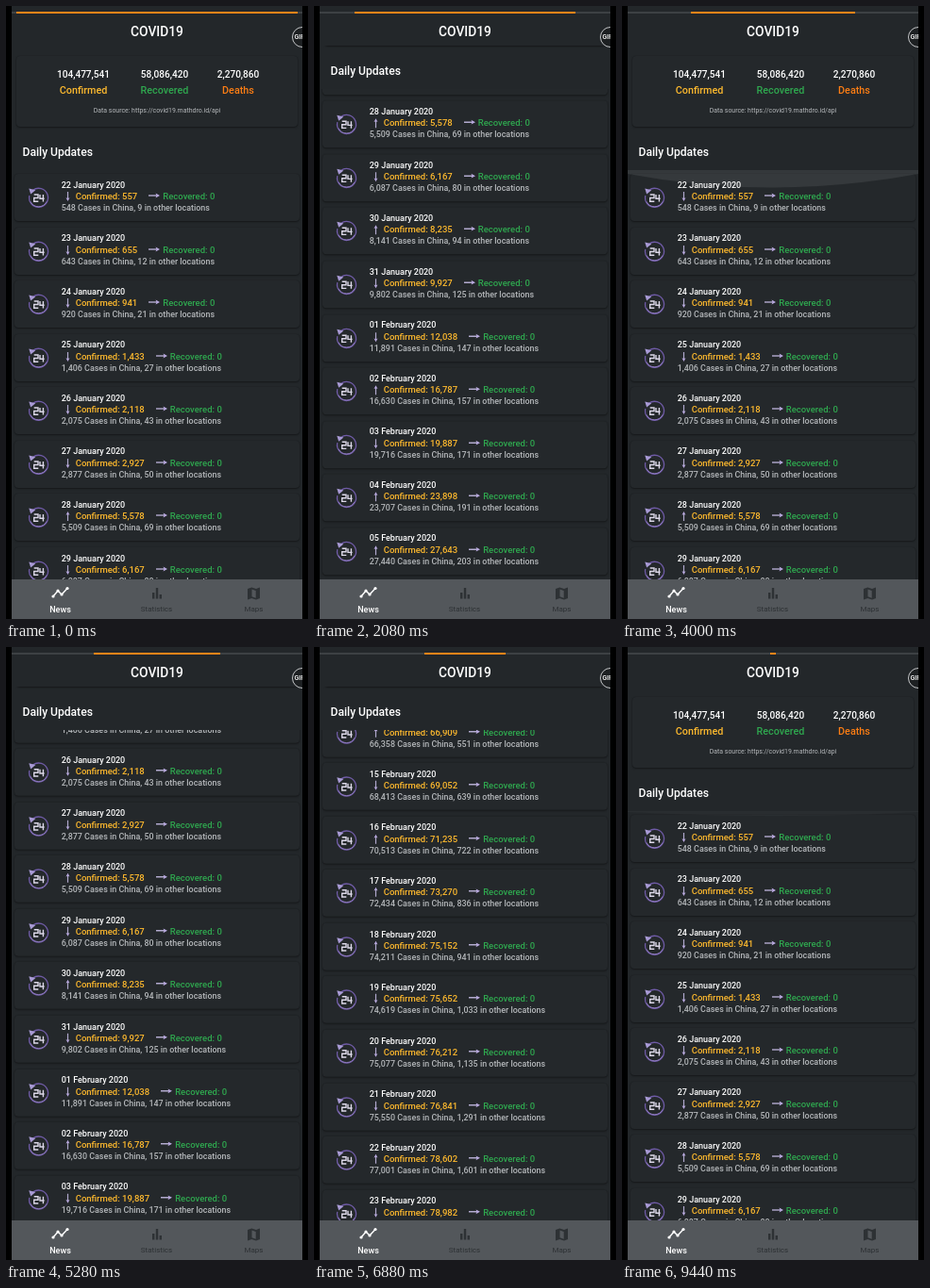
Recreate the animation shown at these times as an HTML page. Size 320x650 px, loop 9600 ms.

```html
<!DOCTYPE html>
<html lang="en">
<head>
<meta charset="utf-8">
<title>Daily updates</title>
<style>
  html, body { margin: 0; width: 100%; height: 100%; overflow: hidden; background: #000; }
  #stage { position: relative; width: 320px; height: 650px; overflow: hidden; background: #000;
    font: 500 9px Roboto, Arial, sans-serif; color: #fff; }
  #app { position: absolute; left: 6px; top: 0; width: 308px; height: 650px; overflow: hidden; background: #23272a; }
  #app div, #app svg.abs { position: absolute; }
  .t { line-height: 20px; margin-top: -10px; white-space: nowrap; }
  .mid { transform: translateX(-50%); }
  .card { border-radius: 4px; background: #24282b; box-shadow: 0 1px 2px rgba(0,0,0,.38), 0 0 1px rgba(0,0,0,.3); }
  .gold { color: #fdb92e; }
  .green { color: #2fa84f; }
  .orange { color: #fb7d14; }
  .grey { color: #b5b8bb; }
  #list { left: 0; top: 174px; width: 308px; overflow: hidden; }
  #rows { left: 0; top: 0; width: 308px; }
  .row { left: 3px; width: 302px; height: 50px; }
  .pair { font-size: 9.5px; }
  .pair svg { width: 12px; height: 6px; margin: 0 3px 0 12px; vertical-align: 1px; }
  #head { left: 0; top: 42px; width: 308px; height: 132px; background: #23272a; }
  #bar { left: 0; top: 0; width: 308px; height: 42px; background: #23272a; }
  #track { left: 0; top: 6px; width: 308px; height: 2px; background: #3d4144; }
  #left { top: 6px; height: 2px; background: #fb8519; }
  #bubble { left: 297px; top: 22px; width: 20px; height: 20px; border: 1px solid #c4c6c8; border-radius: 50%; background: #1d2022; }
  #nav { left: 0; top: 608px; width: 308px; height: 42px; background: #53575b; }
  .dim { color: #2d3134; font-size: 8px; font-weight: 400; }
</style>
</head>
<body>
<div id="stage"><div id="app">
  <div id="list">
    <div id="rows"></div>
    <svg class="abs" width="308" height="40" style="left:0;top:0"><path id="glow" fill="#fff"/></svg>
  </div>
  <div id="head">
    <div class="card" style="left:5px;top:11px;width:298px;height:75px"></div>
    <div id="totals"></div>
    <div class="t mid grey" style="left:154px;top:69px;font-size:6.93px;font-weight:400">Data source: https://covid19.mathdro.id/api</div>
    <div class="t" style="left:11.5px;top:112.5px;font-size:12.1px">Daily Updates</div>
  </div>
  <div id="bar">
    <div class="t mid" style="left:154px;top:27px;font-size:13.8px">COVID19</div>
  </div>
  <div id="track"></div>
  <div id="left"></div>
  <div id="bubble"><div class="t" style="left:1.5px;top:10px;font-size:7px">GIF</div></div>
  <div id="nav">
    <svg class="abs" width="308" height="42" style="left:0;top:0">
      <path d="M44 18 49 12 53 16 59 9.5" fill="none" stroke="#fff" stroke-width="1.5"/>
      <g fill="#fff"><circle cx="44" cy="18" r="1.6"/><circle cx="49" cy="12" r="1.6"/><circle cx="53" cy="16" r="1.6"/><circle cx="59" cy="9.5" r="1.6"/></g>
      <g fill="#2d3134">
        <path d="M149 14h2.4v6.5H149zM152.800 9h2.4v11.500h-2.4zM156.600 16h2.4v4.500h-2.4z"/>
        <path d="M250 10 254.300 8.500 259 10 263 8.500V20L259 21.500 254.300 20 250 21.500z"/>
      </g>
      <path d="M254.500 10.500V18.300L258.700 19.700V12z" fill="#53575b"/>
    </svg>
    <div class="t mid" style="left:51.500px;top:32px">News</div>
    <div class="t mid dim" style="left:153.500px;top:32px">Statistics</div>
    <div class="t mid dim" style="left:256.500px;top:32px">Maps</div>
  </div>
</div></div>
<script>
const LOOP = 9600, STEP = 160, PITCH = 56.55, FOLD = 86;
const $ = id => document.getElementById(id);

// total confirmed, and how many of them outside China, per day
const confirmed = [557, 655, 941, 1433, 2118, 2927, 5578, 6167, 8235, 9927, 12038, 16787,
  19887, 23898, 27643, 30803, 34396, 37130, 40160, 42771, 44814, 45232, 60384, 66909,
  69052, 71235, 73270, 75152, 75652, 76212, 76841, 78602, 78982, 79570, 80415];
const abroad = [9, 12, 21, 27, 43, 50, 69, 80, 94, 125, 147, 157, 171, 191, 203, 216, 286,
  316, 331, 417, 428, 473, 489, 551, 639, 722, 836, 941, 1033, 1135, 1291, 1601, 1960, 2365, 2760];
const rising = new Set([6, 8, 11, 13, 14, 15, 16, 18, 22, 23, 25, 26, 27, 31]);

const num = n => n.toLocaleString('en-US');
const dateText = i => new Date(2020, 0, 22 + i)
  .toLocaleDateString('en-GB', { day: '2-digit', month: 'long', year: 'numeric' });

const arrowShape = '<path d="M0 3H9" stroke="#b3abd0" stroke-width="1.4"/><path d="M7.500 .6 12 3 7.500 5.400 8.500 3z" fill="#b9a9e0"/>';
const arrow = `<svg viewBox="0 0 12 6">${arrowShape}</svg>`;
const badge = up => `<svg class="abs" width="66" height="50" style="left:0;top:0" fill="none">
  <path d="M19.500 17.300A10 10 0 1 1 15.800 23" stroke="#6f5ba6" stroke-width="1.3"/>
  <path d="M17 29.500A9.500 9.500 0 0 0 34 29.500" stroke="#9a86c8" stroke-width=".8"/>
  <path d="M15.300 15.500 22.300 17.200 17.200 21.600z" fill="#a99bd6"/>
  <path d="M20.700 22h4.300v3.500h-4.300v3.700h4.600M27 22v4.200h4.600M30.400 22v7.500" stroke="#dcd8e8" stroke-width="1.4"/>
  <g transform="translate(56.500 24) rotate(${up ? -90 : 90}) scale(.83) translate(-6 -3)">${arrowShape}</g></svg>`;
const text = (cls, x, y, size, html) =>
  `<div class="t ${cls}" style="left:${x}px;top:${y}px;font-size:${size}px">${html}</div>`;

$('rows').innerHTML = confirmed.map((n, i) =>
  `<div class="row card" style="top:${4 + i * PITCH}px">${badge(rising.has(i))}` +
  text('', 49.7, 11.7, 9, dateText(i)) +
  text('pair gold', 64.7, 24, 9.5, `Confirmed: ${num(n)}${arrow}<span class="green">Recovered: 0</span>`) +
  text('grey', 49.7, 36, 8.92, `${num(n - abroad[i])} Cases in China, ${num(abroad[i])} in other locations`) +
  '</div>').join('');

$('totals').innerHTML = [
  [76, 104477541, 'Confirmed', 'gold'],
  [162, 58086420, 'Recovered', 'green'],
  [240, 2270860, 'Deaths', 'orange']
].map(([x, n, label, cls]) =>
  text('mid', x, 30.5, 10.1, num(n)) + text('mid ' + cls, x, 48, 10.8, label)).join('');

// time and distance scrolled
const keys = [[0, 0], [480, 0], [1280, 250], [2080, 416.8], [2400, 440], [2880, 330], [3760, 0],
  [4480, 0], [5280, 296.2], [6080, 880], [6880, 1412.2], [7040, 1425], [8160, 514.5], [8880, 0], [LOOP, 0]];
const rate = i => (keys[i + 1][1] - keys[i][1]) / (keys[i + 1][0] - keys[i][0]);
const slope = keys.map((k, i) => {
  if (!i || i === keys.length - 1) return 0;
  const a = rate(i - 1), b = rate(i);
  return a * b > 0 ? 2 * a * b / (a + b) : 0;
});

function scrolled(t) {
  let i = 0;
  while (i < keys.length - 2 && t >= keys[i + 1][0]) i++;
  const [t0, y0] = keys[i], [t1, y1] = keys[i + 1], d = t1 - t0, u = (t - t0) / d, v = 1 - u;
  return v * v * ((1 + 2 * u) * y0 + u * d * slope[i]) + u * u * ((1 + 2 * v) * y1 - v * d * slope[i + 1]);
}

// the summary folds away first on the way down and returns first on the way up
function folded(t, y) {
  const peak = t > 7040 ? 1425 : t > 2400 && t < 4480 ? 440 : 0;
  return Math.max(0, Math.min(FOLD, peak ? FOLD - (peak - y) : y));
}

function glowAt(t) {
  const age = t - (t > 6000 ? 8880 : 3800);
  if (age < 0 || age > 700) return 0;
  return age < 120 ? age / 120 : Math.min(1, (700 - age) / 500);
}

function draw(t) {
  const y = scrolled(t), fold = folded(t, y), g = glowAt(t), width = Math.max(0, 298.4 - 0.03098 * t);
  $('head').style.transform = `translateY(${-fold}px)`;
  $('list').style.top = 174 - fold + 'px';
  $('list').style.height = 434 + fold + 'px';
  $('rows').style.transform = `translateY(${fold - y}px)`;
  $('left').style.left = 154 - width / 2 + 'px';
  $('left').style.width = width + 'px';
  $('glow').setAttribute('d', `M0 0V${4 * g}Q154 ${33 * g} 308 ${4 * g}V0z`);
  $('glow').setAttribute('opacity', 0.08 * Math.min(1, g * 1.2));
}

function tick() {
  draw(Math.floor(performance.now() % LOOP / STEP) * STEP);
  requestAnimationFrame(tick);
}
tick();
</script>
</body>
</html>
```
